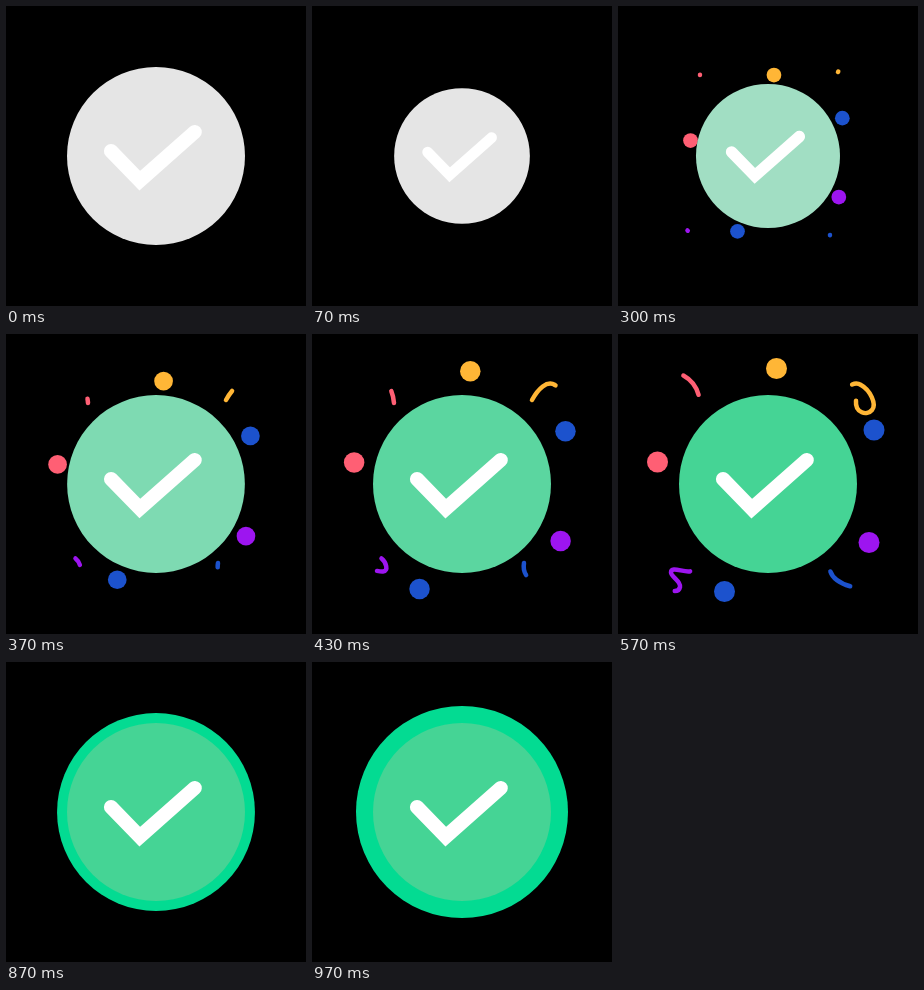
An HTML page for the animation above (1010 ms loop, 300 by 300 pixels).

```html
<!DOCTYPE html>
<html lang="en">
<head>
<meta charset="utf-8">
<title>Success check</title>
<style>
  html, body { margin: 0; width: 100%; height: 100%; overflow: hidden; background: #000; }
  svg { display: block; width: 100%; height: 100%; }
  .ribbon { fill: none; stroke-width: 4.5; stroke-linecap: round; stroke-linejoin: round; }
</style>
</head>
<body>
<svg viewBox="0 0 300 300">
  <g id="ribbons"></g>
  <g id="dots"></g>
  <circle id="ring" cx="150" cy="150" r="0" fill="#03db92"/>
  <g id="badge">
    <circle id="disc" cx="150" cy="150" r="89"/>
    <path d="M105 145L133.8 174.6L188.7 126" fill="none" stroke="#fff" stroke-width="14.2" stroke-linecap="round"/>
  </g>
</svg>
<script>
const LOOP = 1010, FPS = 30, LAST = 29;
const PINK = '#ff5f74', ORANGE = '#ffb636', BLUE = '#1c52cd', PURPLE = '#9d15f0';
const GREY = [229, 229, 229], GREEN = [69, 212, 149];

const DOTS = [
  [39.5, 128, PINK],
  [158.5, 34.5, ORANGE],
  [256, 96, BLUE],
  [251, 208.5, PURPLE],
  [106.5, 257.5, BLUE]
];
const RIBBONS = [
  ['M82 69C81 54 72 38 46 36.5', PINK],
  ['M220 66C226 55 235 46 243 51C252 56 259 70 254 76C249 82 237 79 238 67C239 58 255 41 280 48.5', ORANGE],
  ['M69.5 224.5C74 228 77 237 71 237.5C64 238 53 232 53 238.5C53 243 63 247 62 253C61 258 56 257 55 257C48 257 47 251 42 251C37 252 38.5 263 40.5 269.5', PURPLE],
  ['M212 229C210 240 217 248 233 252.5C240 254.5 243 258 246 266', BLUE]
];

const $ = id => document.getElementById(id);
function add(parent, tag, attrs) {
  const el = document.createElementNS('http://www.w3.org/2000/svg', tag);
  for (const key in attrs) el.setAttribute(key, attrs[key]);
  return parent.appendChild(el);
}

const dots = $('dots'), ring = $('ring'), badge = $('badge'), disc = $('disc');
DOTS.forEach(([cx, cy, fill]) => add(dots, 'circle', { cx, cy, r: 10.5, fill }));
const ribbons = RIBBONS.map(([d, stroke]) =>
  add($('ribbons'), 'path', { d, stroke, class: 'ribbon', pathLength: 100 }));

const span = (t, from, to) => Math.min(1, Math.max(0, (t - from) / (to - from)));
const smooth = x => x * x * (3 - 2 * x);
const easeOut = x => 1 - (1 - x) ** 3;
const mix = (a, b, x) => a + (b - a) * x;

function zoom(el, s) {
  el.setAttribute('transform', `translate(150 150) scale(${s}) translate(-150 -150)`);
  el.style.display = s > 0 ? '' : 'none';
}

function draw(t) {
  // Badge shrinks, then pops back while turning green
  const small = 0.325;
  zoom(badge, t < 167
    ? mix(1, small, smooth(span(t, 0, 166.7)))
    : mix(small, 1, smooth(span(t, 166.7, 372))));
  const tint = span(t, 170, 476);
  disc.setAttribute('fill', `rgb(${GREY.map((c, i) => Math.round(mix(c, GREEN[i], tint)))})`);

  // Dots burst out and fall back behind the badge
  zoom(dots, easeOut(span(t, 184, 534)) - span(t, 613, 965) ** 3);

  // Ribbons travel along their paths
  const tail = 100 * smooth(span(t, 475, 842));
  const head = 100 * smooth(span(t, 283, 768));
  for (const path of ribbons) {
    path.style.display = head > tail ? '' : 'none';
    path.setAttribute('stroke-dasharray', `${head - tail} 300`);
    path.setAttribute('stroke-dashoffset', -tail);
  }

  const grow = smooth(span(t, 733.4, 966));
  ring.setAttribute('r', grow > 0 ? mix(88, 106, grow) : 0);
}

function tick() {
  const ms = performance.now() % LOOP;
  const step = Math.min(LAST, Math.floor((ms + 3.4) * FPS / 1000));
  draw(step * 1000 / FPS);
  requestAnimationFrame(tick);
}
tick();
</script>
</body>
</html>
```
